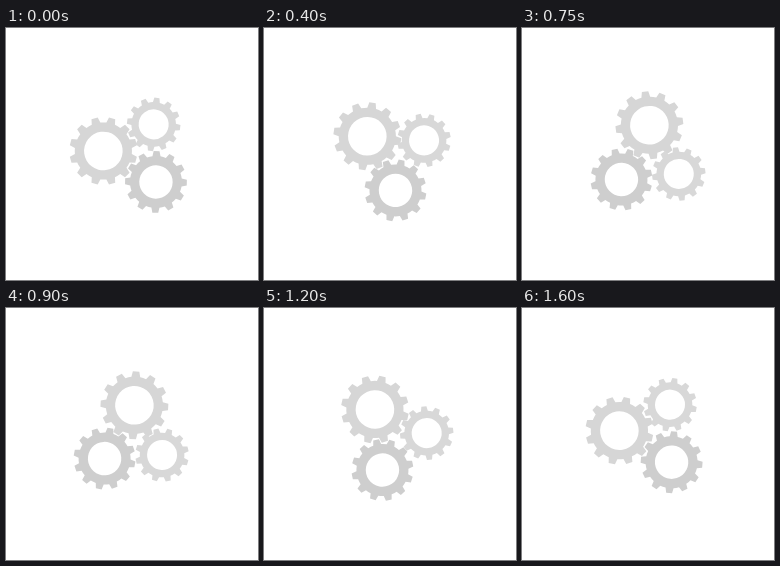
Animation, 252 px wide and 252 px high, one loop 1650 ms. Source, as an HTML page with a canvas:

```html
<!DOCTYPE html>
<html>
<head>
<meta charset="utf-8">
<style>
html, body { margin: 0; width: 100%; height: 100%; overflow: hidden; background: #fff; }
canvas { display: block; width: 252px; height: 252px; }
</style>
</head>
<body>
<canvas id="stage"></canvas>
<script>
const SIZE = 252, CENTER = 126, LOOP = 1650, STEP = 50, TEETH = 12;
const TAU = Math.PI * 2, RAD = Math.PI / 180;
const canvas = document.getElementById('stage');
const ctx = canvas.getContext('2d');
const scale = window.devicePixelRatio || 1;
canvas.width = canvas.height = SIZE * scale;

// orbit and angle place the gear; spin is its turning direction
const gears = [
  { orbit: 28.8, angle: 186, outer: 34, body: 28.6, hole: 19.3, phase: 15, spin: 1, color: '#d6d6d6' },
  { orbit: 36.7, angle: -53.8, outer: 26.8, body: 22.3, hole: 15, phase: 7, spin: -1, color: '#d8d8d8' },
  { orbit: 36.8, angle: 49.4, outer: 31, body: 26, hole: 16.7, phase: 1.2, spin: -1, color: '#cecece' }
];

function drawGear(g, swing, turn) {
  const a = (g.angle + swing) * RAD;
  ctx.save();
  ctx.translate(CENTER + g.orbit * Math.cos(a), CENTER + g.orbit * Math.sin(a));
  ctx.rotate((g.phase + swing + g.spin * turn) * RAD);
  ctx.beginPath();
  for (let i = 0; i < TEETH; i++) {
    const mid = i * TAU / TEETH;
    const root = 0.155, tip = 0.095;
    ctx.arc(0, 0, g.body, mid - TAU / TEETH + root, mid - root);
    ctx.lineTo(g.outer * Math.cos(mid - tip), g.outer * Math.sin(mid - tip));
    ctx.lineTo(g.outer * Math.cos(mid + tip), g.outer * Math.sin(mid + tip));
  }
  ctx.closePath();
  ctx.moveTo(g.hole, 0);
  ctx.arc(0, 0, g.hole, 0, TAU, true);
  ctx.fillStyle = g.color;
  ctx.fill();
  ctx.restore();
}

const ease = x => (1 - Math.cos(Math.PI * Math.min(1, Math.max(0, x)))) / 2;

// the whole group swings a quarter turn and back
function swingAt(t) {
  return 90 * (t < 840 ? ease((t - 98) / 742) : 1 - ease((t - 840) / 805));
}

function frame(now) {
  const t = Math.floor(now % LOOP / STEP) * STEP;
  ctx.setTransform(scale, 0, 0, scale, 0, 0);
  ctx.fillStyle = '#fff';
  ctx.fillRect(0, 0, SIZE, SIZE);
  for (const g of gears) drawGear(g, swingAt(t), 90 * t / LOOP);
  requestAnimationFrame(frame);
}
requestAnimationFrame(frame);
</script>
</body>
</html>
```
